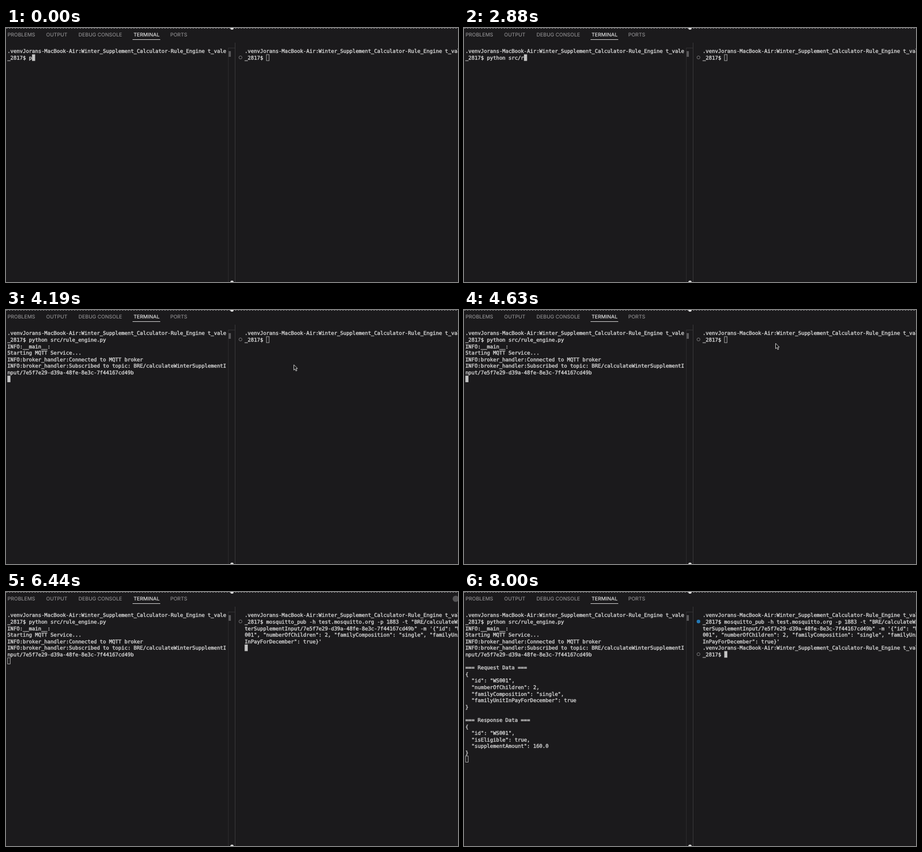
An HTML page with a canvas that plays this animation: 800x450 px, repeating every 9190 ms.

```html
<!DOCTYPE html>
<html lang="en">
<head>
<meta charset="utf-8">
<style>
  html, body { margin: 0; height: 100%; overflow: hidden; background: #1b1a1c; }
  canvas { display: block; }
</style>
</head>
<body>
<canvas id="stage" width="800" height="450"></canvas>
<script>
const ctx = document.getElementById('stage').getContext('2d');
const LOOP = 9190, TICK = 62.5;
const CELL = 5.46, LINE = 11.6, TOP = 35.1;
const LEFT = 2.4, RIGHT = 422.4;
const FG = '#d2d2d2', DIM = '#8b8a8c', RULE = '#3b3a3c';

const prompt = '.venvJorans-MacBook-Air:Winter_Supplement_Calculator-Rule_Engine t_vale_2817$ ';
const topic = 'BRE/calculateWinterSupplementInput/7e5f7e29-d39a-48fe-8e3c-7f44167cd49b';
const publish = `mosquitto_pub -h test.mosquitto.org -p 1883 -t "${topic}" -m ` +
  `'{"id": "WS001", "numberOfChildren": 2, "familyComposition": "single", "familyUnitInPayForDecember": true}'`;
const request = `
=== Request Data ===
{
  "id": "WS001",
  "numberOfChildren": 2,
  "familyComposition": "single",
  "familyUnitInPayForDecember": true
}
`;
const response = `
=== Response Data ===
{
  "id": "WS001",
  "isEligible": true,
  "supplementAmount": 160.0
}
`;

// Typed command, including one corrected key
const typing = [
  [0, 'p'], [310, 'py'], [690, 'pyt'], [810, 'pyth'], [940, 'pytho'], [1060, 'python'],
  [1250, 'python '], [1630, 'python s'], [1690, 'python sr'], [1810, 'python srv'],
  [2000, 'python sr'], [2130, 'python src'], [2380, 'python src/'], [2880, 'python src/r'],
  [3060, 'python src/rule_engine.py ']
];
const output = [
  [3500, '\n'],
  [3560, 'INFO:__main__:\nStarting MQTT Service...\n'],
  [3630, 'INFO:broker_handler:Connected to MQTT broker\n'],
  [3810, `INFO:broker_handler:Subscribed to topic: ${topic}\n`],
  [6750, request],
  [6880, response]
];
const shell = [[0, prompt], [5630, publish], [6310, '\n'], [6690, prompt]];

// Pointer visits: time, x, y
const visits = [
  [[3870, 440, 164], [4060, 470, 130], [4250, 528, 80], [4440, 551, 58],
   [4620, 551, 58], [4630, 551, 59], [4870, 551, 59], [4880, 558, 62], [5630, 558, 62]],
  [[7190, 477, 44], [7310, 330, 170], [7430, 178, 296], [7500, 222, 311],
   [7930, 222, 311], [7940, 262, 251], [8000, 262, 251]]
];

const latest = (steps, t) => steps.filter(s => s[0] <= t).pop()[1];
const joined = (steps, t) => steps.filter(s => s[0] <= t).map(s => s[1]).join('');
const wrap = text => text.split('\n').flatMap(row => row.match(/.{1,71}/g) || ['']);

function line(x1, y1, x2, y2, color) {
  ctx.strokeStyle = color;
  ctx.lineWidth = 1;
  ctx.beginPath();
  ctx.moveTo(x1, y1);
  ctx.lineTo(x2, y2);
  ctx.stroke();
}

function circle(x, y, r, color, filled) {
  ctx.beginPath();
  ctx.arc(x, y, r, 0, 7);
  ctx.lineWidth = 1;
  ctx.fillStyle = ctx.strokeStyle = color;
  filled ? ctx.fill() : ctx.stroke();
}

function label(text, x, color) {
  ctx.font = '500 9px Inter, sans-serif';
  ctx.fillStyle = color;
  ctx.fillText(text, x, 15.3);
}

function terminal(text, x, focused) {
  const rows = wrap(text);
  ctx.font = '9.07px "DejaVu Sans Mono", monospace';
  ctx.fillStyle = ctx.strokeStyle = FG;
  ctx.lineWidth = 0.4;
  rows.forEach((row, i) => {
    const y = TOP + 9.2 + i * LINE;
    ctx.fillText(row, x, y);
    ctx.strokeText(row, x, y);
  });
  const cx = x + rows.at(-1).length * CELL;
  const cy = TOP + (rows.length - 1) * LINE;
  ctx.fillStyle = ctx.strokeStyle = '#c4c4c4';
  ctx.lineWidth = 0.8;
  if (focused) ctx.fillRect(cx, cy, CELL, LINE);
  else ctx.strokeRect(cx + 0.4, cy + 0.4, CELL - 0.8, LINE - 0.8);
}

function chrome() {
  ctx.fillStyle = '#1b1a1c';
  ctx.fillRect(0, 0, 800, 450);
  ctx.setLineDash([3, 2]);
  line(0, 0.5, 800, 0.5, '#858486');
  ctx.setLineDash([]);
  circle(400, 0, 3, '#dddddd', true);
  circle(400, 450.5, 3, '#dddddd', true);
  [['PROBLEMS', 2.7], ['OUTPUT', 71], ['DEBUG CONSOLE', 128.3], ['PORTS', 290.7]]
    .forEach(([text, x]) => label(text, x, DIM));
  label('TERMINAL', 225.7, '#e4e4e4');
  line(224, 20.5, 273, 20.5, '#d0d0d0');
  line(405.5, 26, 405.5, 450, RULE);
  line(393.5, 35, 393.5, 450, '#2b2a2c');
  line(393, 35.5, 405, 35.5, '#333234');
  ctx.fillStyle = '#59585a';
  ctx.fillRect(394, 41, 4, 10);
}

function pointer(t) {
  const path = visits.find(p => t >= p[0][0] && t < p.at(-1)[0]);
  if (!path) return;
  const now = Math.max(path[0][0], Math.floor((t + 3) / TICK) * TICK);
  const i = Math.max(1, path.findIndex(p => p[0] > now));
  const [a, b] = [path[i - 1], path[i]];
  const k = (now - a[0]) / (b[0] - a[0]);
  ctx.save();
  ctx.translate(a[1] + (b[1] - a[1]) * k, a[2] + (b[2] - a[2]) * k);
  const arrow = new Path2D('M.5 .5V10L2.6 8 4.2 11.6 5.9 10.9 4.3 7.3H7.1Z');
  ctx.fillStyle = '#0b0b0b';
  ctx.strokeStyle = '#e0e0e0';
  ctx.lineWidth = 0.9;
  ctx.fill(arrow);
  ctx.stroke(arrow);
  ctx.restore();
}

function draw(t) {
  const rightFocused = t >= 4940, done = t >= 6690;
  chrome();
  terminal(prompt + latest(typing, t) + joined(output, t), LEFT, !rightFocused);
  terminal(joined(shell, t), RIGHT, rightFocused);
  circle(415, 52.2, done ? 3.2 : 2.7, done ? '#2479b5' : '#777678', done);
  if (done) circle(415, 110.2, 2.7, '#777678');
  if (t >= 6310 && !done) circle(796, 12, 5.5, '#555456', true);
  pointer(t);
}

ctx.textRendering = 'geometricPrecision';
const start = performance.now();
(function frame() {
  draw((performance.now() - start) % LOOP);
  requestAnimationFrame(frame);
})();
</script>
</body>
</html>
```
